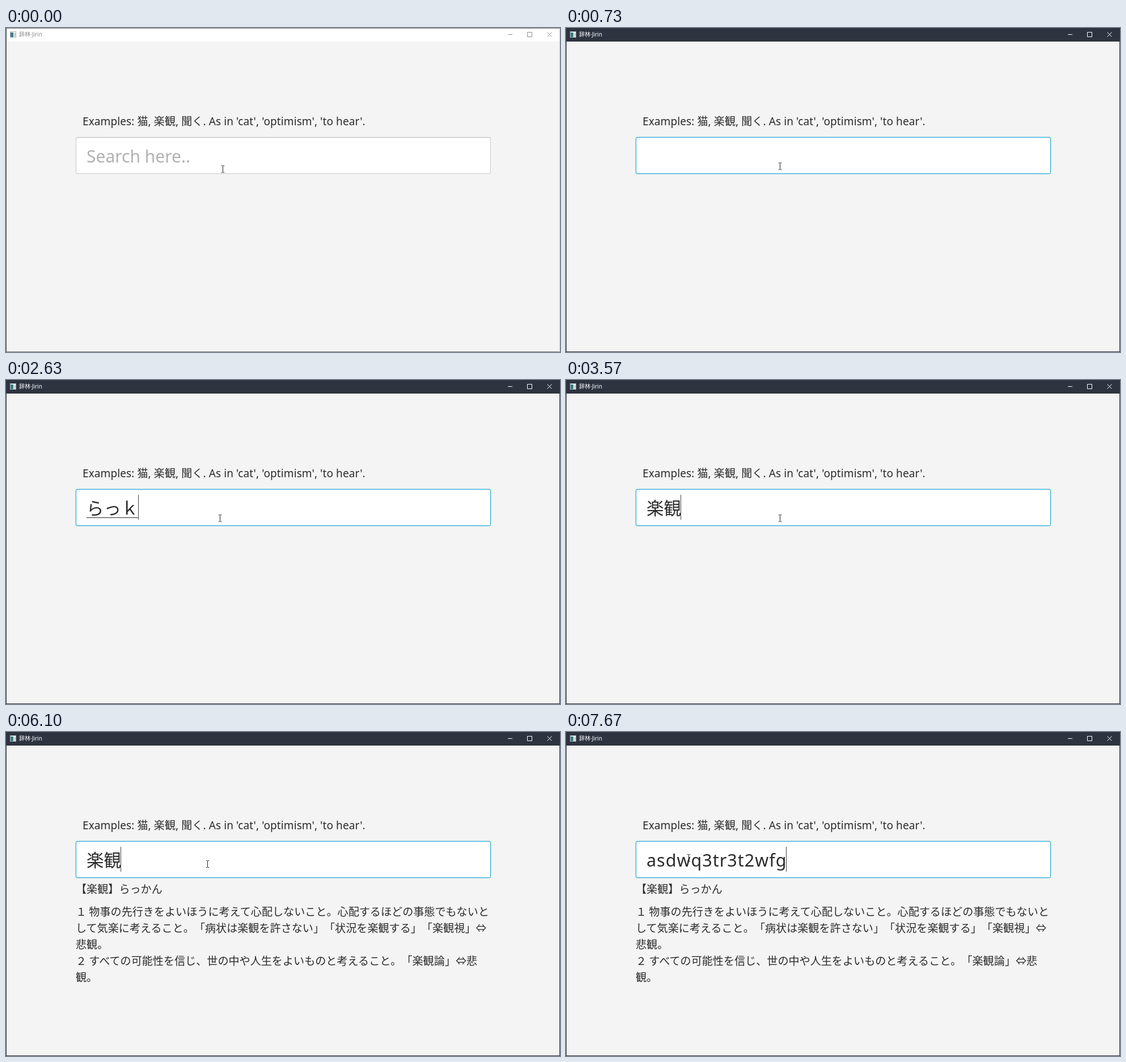
Animation of 977 by 573 pixels, one loop 8000 ms. Source, as an HTML page:

```html
<!DOCTYPE html>
<html lang="ja">
<head>
<meta charset="utf-8">
<title>辞林·Jirin</title>
<style>
  html, body { margin: 0; width: 100%; height: 100%; overflow: hidden; }
  body {
    position: relative; background: #f4f4f4; color: #2b2b2b;
    font: 350 19px/30px "Noto Sans", "Noto Sans CJK JP", sans-serif;
    text-spacing-trim: space-all; white-space: pre;
  }
  body > * { position: absolute; }

  #bar {
    left: 0; top: 0; width: 977px; height: 24px;
    background: #fff; color: #8c8c8c; font-size: 10px; line-height: 23px;
  }
  #bar span { position: absolute; left: 23px; top: 0; }
  #bar svg { position: absolute; left: 0; top: 0; }
  #frame {
    left: 0; top: 0; width: 977px; height: 573px; box-sizing: border-box;
    border: 1px solid; border-color: #777 #ccc #777 #4a4a4a;
  }
  .active #bar { background: #2e3340; color: #fff; }
  .active #frame { border-color: #2e3340; }

  #hint { left: 135px; top: 150px; letter-spacing: .1px; }
  #field {
    left: 123px; top: 193px; width: 732px; height: 65px; box-sizing: border-box;
    border: 1px solid #c8c8c8; border-top-color: #b5b5b5; border-radius: 3px;
    background: #fff; font-size: 30.5px; line-height: 62px; padding-left: 18px;
  }
  #prompt { font-size: 30px; color: #b2b2b2; }
  .focused #field { border-color: #2aaad6; box-shadow: 0 0 0 .5px #86cce6; }
  .focused #prompt { display: none; }
  .composing #typed {
    text-decoration: underline 1px; text-underline-offset: 5px;
  }
  .latin #typed { letter-spacing: 1px; }
  #selected {
    display: inline-block; height: 44px; line-height: 44px;
    background: #0096c9; color: #fff;
  }
  #caret {
    position: absolute; top: 9px; width: 1px; height: 44px;
    margin-left: -1px; background: #444;
  }

  #entry {
    left: 123px; top: 263px; line-height: 29px; font-size: 19.1px;
    font-family: "Noto Sans CJK JP", sans-serif; visibility: hidden;
  }
  #entry p { margin: 0 0 11px; }
  .found #entry { visibility: visible; }
  #pointer { left: 0; top: 0; }
</style>
</head>
<body>
<div id="bar">
  <svg width="977" height="23" fill="none" stroke="currentColor">
    <rect x="7.5" y="6.5" width="10" height="10" fill="#f2f5f6" stroke="#a9b4b8"/>
    <rect x="8" y="8" width="5" height="8" fill="#3b7f86" stroke="none"/>
    <rect x="14" y="9" width="3" height="6" fill="#ccd3d6" stroke="none"/>
    <path d="M885 11.5h8M919.5 7.5h8v8h-8zM954.5 7.5l8 8M962.5 7.5l-8 8"/>
  </svg><span>辞林·Jirin</span>
</div>
<div id="hint">Examples: 猫, 楽観, 聞く. As in 'cat', 'optimism', 'to hear'.</div>
<div id="field"><span id="prompt">Search here..</span><span id="typed"></span><i id="caret"></i><span id="selected"></span></div>
<div id="entry"><p>【楽観】らっかん</p><p>１ 物事の先行きをよいほうに考えて心配しないこと。心配するほどの事態でもないと
して気楽に考えること。「病状は楽観を許さない」「状況を楽観する」「楽観視」⇔
悲観。
２ すべての可能性を信じ、世の中や人生をよいものと考えること。「楽観論」⇔悲
観。</p></div>
<svg id="pointer" width="7" height="13" fill="none" stroke="#222">
  <path d="M1 .5h2M4 .5h2M3.5 1v11M1 12.5h2M4 12.5h2"/>
</svg>
<div id="frame"></div>
<script>
  const LOOP = 8000, STEP = 100 / 3, WORD = '楽観';
  const $ = id => document.getElementById(id);

  // [time, text in the field]
  const typing = [
    [0, ''], [2230, 'ｒ'], [2400, 'ら'], [2470, 'らｋ'], [2570, 'らっｋ'], [2670, 'らっか'],
    [2900, 'らっかｎ'], [3070, WORD], [7130, 'as'], [7170, 'asd'], [7330, 'asdwq'],
    [7370, 'asdwq3tr'], [7530, 'asdwq3tr3t2w'], [7670, 'asdwq3tr3t2wfg']
  ];

  // [time, x, y]
  const path = [
    [0, 382, 249], [30, 382, 249], [165, 377, 244], [5560, 377, 244],
    [5630, 369, 236], [5790, 369, 236], [5900, 355, 233], [6520, 355, 233],
    [6570, 368, 236], [6740, 212, 232], [6800, 206, 231], [6930, 71, 230],
    [7090, 216, 222], [LOOP, 216, 222]
  ];

  const between = (t, a, b) => t >= a && t < b;

  function pointerAt(time) {
    const t = Math.floor(time / STEP + .01) * STEP;
    const i = path.findIndex(p => p[0] > t);
    const [t0, x0, y0] = path[i - 1], [t1, x1, y1] = path[i];
    const k = (t - t0) / (t1 - t0);
    return [Math.round(x0 + (x1 - x0) * k), Math.round(y0 + (y1 - y0) * k)];
  }

  function selectionStart(t, x) {
    if (!between(t, 6800, 7130)) return WORD.length;
    if (t >= 6930) return 0;
    return x < 157 ? 0 : x < 187 ? 1 : 2;
  }

  function setText(el, text) {
    if (el.textContent !== text) el.textContent = text;
  }

  function draw(now) {
    const t = now % LOOP;
    const [x, y] = pointerAt(t);
    const text = typing.findLast(s => s[0] <= t)[1];
    const cut = text === WORD ? selectionStart(t, x) : text.length;
    setText($('typed'), text.slice(0, cut));
    setText($('selected'), text.slice(cut));

    const states = {
      active: t >= 165,
      focused: t >= 200,
      composing: between(t, 2230, 3570),
      found: t >= 6100,
      latin: t >= 7130
    };
    for (const name in states) document.body.classList.toggle(name, states[name]);

    const blinkOn = t >= 2230 || Math.floor((t - 230) / 500) % 2 === 0;
    $('caret').style.opacity = t >= 230 && blinkOn ? 1 : 0;
    $('pointer').style.transform = `translate(${x - 3}px, ${y - 6}px)`;
    requestAnimationFrame(draw);
  }
  requestAnimationFrame(draw);
</script>
</body>
</html>
```
